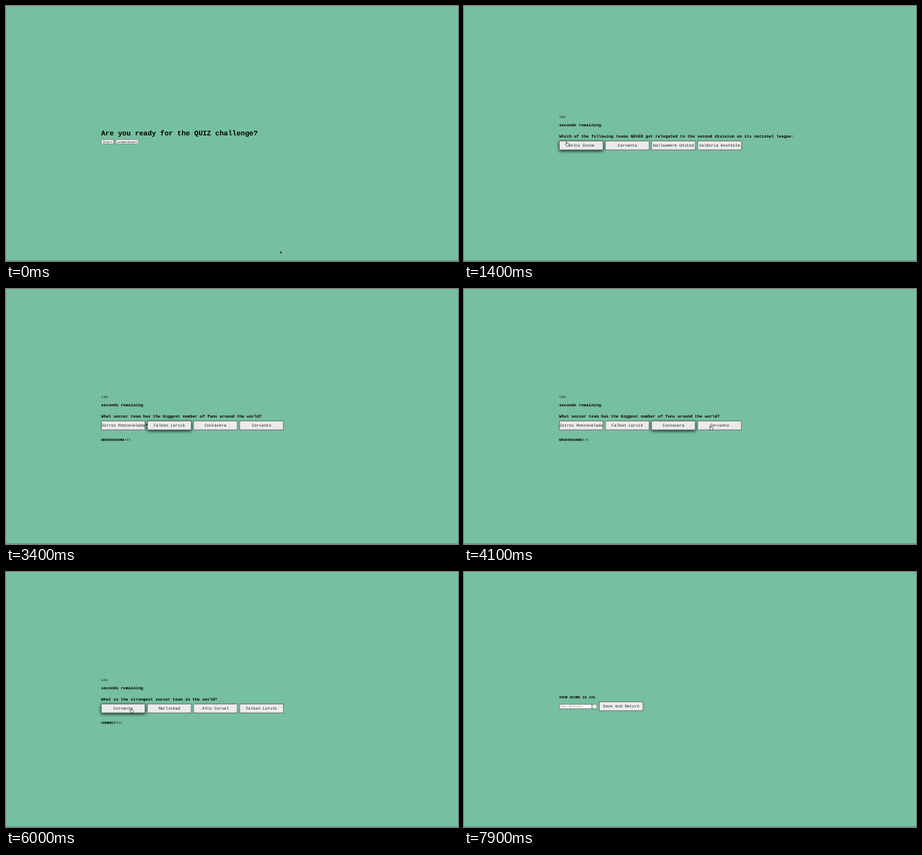
Write an HTML page with a canvas that moves like this. It is 600 px wide and 339 px high and loops after 8000 ms.

```html
<!DOCTYPE html>
<html lang="en">
<head>
<meta charset="utf-8">
<title>Quiz challenge</title>
<style>
  html, body { margin: 0; height: 100%; overflow: hidden; background: #76bfa0; }
  canvas { display: block; }
</style>
</head>
<body>
<canvas id="stage" width="600" height="339"></canvas>
<script>
const ctx = document.getElementById('stage').getContext('2d');
const LOOP = 8000, STEP = 100, LEFT = 126.5;

const questions = [
  { from: 1300, y: 0, message: '',
    text: 'Which of the following teams NEVER got relegated to the second division on its national league:',
    answers: ['Delta Stone', 'Corvanto', 'Hallowmere United', 'Valdoria Kesthelm'] },
  { from: 2600, y: -4, message: 'WROOOOOOONG!!!',
    text: 'What soccer team has the biggest number of fans around the world?',
    answers: ['Zorros Montevelada', 'Falken Lorvik', 'Costavera', 'Corvanto'] },
  { from: 4200, y: -4, message: 'CORRECT!!!',
    text: 'What is the best soccer player of all time after Dozé?',
    answers: ['Leandrino Castejo', 'Belfiora', 'Tuvo', 'Lorpi'] },
  { from: 5400, y: -4, message: 'CORRECT!!!',
    text: 'What is the strongest soccer team in the world?',
    answers: ['Corvanto', 'Marlstead', 'Alto Corvel', 'Falken Lorvik'] },
];
const SCORE_FROM = 6400;

// [time, value]
const countdown = [[1300, 200], [2200, 199], [2600, 149], [3300, 148], [4400, 147], [5400, 146]];

// [time, x, y] of the pointer's hot spot
const path = [
  [0, 364, 325.5], [400, 230, 215], [600, 152, 150], [800, 136, 180], [1600, 136.3, 180.8],
  [2400, 264, 187], [2500, 264, 187], [3300, 193, 179], [3400, 185.8, 178.5],
  [3600, 170, 180], [4200, 340, 182], [4300, 340, 182], [4900, 240.5, 182],
  [5100, 262, 183], [5500, 262, 183], [6000, 166, 181.5], [7200, 166, 181.5],
  [7500, 205, 180], [7700, 185, 167], [7900, 170, 177], [8000, 170, 177],
];

const latest = (list, time, key) => list.filter(item => item[key] <= time).pop();

function pointerAt(time) {
  const i = path.findIndex(p => p[0] > time);
  const [t0, x0, y0] = path[i - 1], [t1, x1, y1] = path[i];
  const k = (time - t0) / (t1 - t0), e = k * k * (3 - 2 * k);
  return { x: x0 + (x1 - x0) * e, y: y0 + (y1 - y0) * e };
}

const inside = (p, b) => p.x >= b.x && p.x <= b.x + b.w && p.y >= b.y && p.y <= b.y + b.h;

// Drawn large and scaled down so that glyph advances stay fractional.
function text(str, x, y, size, { bold = false, color = '#000', align = 'left' } = {}) {
  ctx.save();
  ctx.translate(x, y);
  ctx.scale(size / 100, size / 100);
  ctx.font = `${bold ? 'bold ' : ''}100px "Liberation Mono", monospace`;
  ctx.textRendering = 'geometricPrecision';
  ctx.textAlign = align;
  ctx.fillStyle = color;
  ctx.fillText(str, 0, 0);
  ctx.restore();
}

function box(b, fill, border, radius = 0) {
  ctx.beginPath();
  ctx.roundRect(b.x, b.y, b.w, b.h, radius);
  ctx.fillStyle = fill;
  ctx.fill();
  ctx.shadowColor = 'transparent';
  ctx.strokeStyle = border;
  ctx.lineWidth = 0.7;
  ctx.stroke();
}

function bigButton(b, label, hovered) {
  ctx.save();
  if (hovered) {
    ctx.shadowColor = 'rgba(0,0,0,.95)';
    ctx.shadowBlur = 4;
    ctx.shadowOffsetY = 1.3;
  }
  box(b, '#ebebeb', '#4a5450');
  ctx.restore();
  text(label, b.x + b.w / 2, b.y + 7.6, 5.33, { color: '#222', align: 'center' });
}

function smallButton(b, label, pressed) {
  box(b, pressed ? '#d2d2d2' : '#efefef', '#767676', 0.8);
  text(label, b.x + b.w / 2, b.y + 4.2, 3.89, { color: '#222', align: 'center' });
}

const cursors = {
  arrow: { d: 'M0 0V3.6L.9 2.9L1.5 4.2L2.1 3.9L1.6 2.7H2.6Z', fill: '#000', line: 'rgba(255,255,255,.3)' },
  hand: { d: 'M-.7 .3Q0-.3 .5 .4V2L2.8 2.6Q3.2 3 2.9 4L2.3 5.4H-.2L-1.8 3.2Q-1.7 2.5-.7 3Z', fill: '#fff', line: '#222' },
  beam: { d: 'M-1-.2H1M0-.2V4.2M-1 4.2H1', fill: 'transparent', line: '#222' },
};

function drawCursor(p, name) {
  const { d, fill, line } = cursors[name], shape = new Path2D(d);
  ctx.save();
  ctx.translate(p.x, p.y);
  ctx.fillStyle = fill;
  ctx.strokeStyle = line;
  ctx.lineWidth = 0.6;
  ctx.fill(shape);
  ctx.stroke(shape);
  ctx.restore();
}

// Each screen returns the cursor it wants.
function startScreen(time, p) {
  const start = { x: LEFT, y: 177.5, w: 16.3, h: 5.8 };
  const board = { x: 145.8, y: 177.5, w: 30, h: 5.8 };
  text('Are you ready for the QUIZ challenge?', 126.2, 171.5, 9.36, { bold: true });
  smallButton(start, 'Start', time >= 1000 && time < 1100);
  smallButton(board, 'Leaderboard', false);
  return 'arrow';
}

function quizScreen(time, p) {
  const { text: question, answers, message, y } = latest(questions, time, 'from');
  const before = pointerAt(time - STEP);
  let cursor = 'arrow';
  text(latest(countdown, time, 0)[1], 126.3, 148.6 + y, 4.67, { color: '#222' });
  text('seconds remaining', 126.3, 159.7 + y, 5.46, { bold: true });
  text(question, 126.3, 174.7 + y, 5.46, { bold: true });
  answers.forEach((label, i) => {
    const b = { x: LEFT + i * 61.2, y: 179.4 + y, w: 58.2, h: 11.9 };
    bigButton(b, label, inside(before, b));
    if (inside(p, b)) cursor = 'hand';
  });
  text(message, 126.3, 201.8, 4.67, { bold: true });
  return cursor;
}

function scoreScreen(time, p) {
  const field = { x: LEFT, y: 176, w: 49.8, h: 5.8 };
  const save = { x: 179.5, y: 172.5, w: 58.2, h: 11.9 };
  text('YOUR SCORE IS 145', 126.3, 168.2, 4.67, { bold: true });
  box(field, '#fff', '#666');
  text('Your Initials', 127.6, 180.1, 3.89, { color: '#757575' });
  bigButton(save, 'Save and Return', inside(p, save));
  return inside(p, field) ? 'beam' : inside(p, save) ? 'hand' : 'arrow';
}

function draw(now) {
  const time = Math.floor(now % LOOP / STEP) * STEP;
  const p = pointerAt(time);
  ctx.fillStyle = '#76bfa0';
  ctx.fillRect(0, 0, 600, 339);
  ctx.fillStyle = '#5f9482';
  ctx.fillRect(0, 338, 600, 1);
  const screen = time < questions[0].from ? startScreen : time < SCORE_FROM ? quizScreen : scoreScreen;
  drawCursor(p, screen(time, p));
}

const began = performance.now();
(function frame() {
  draw(performance.now() - began);
  requestAnimationFrame(frame);
})();
</script>
</body>
</html>
```
